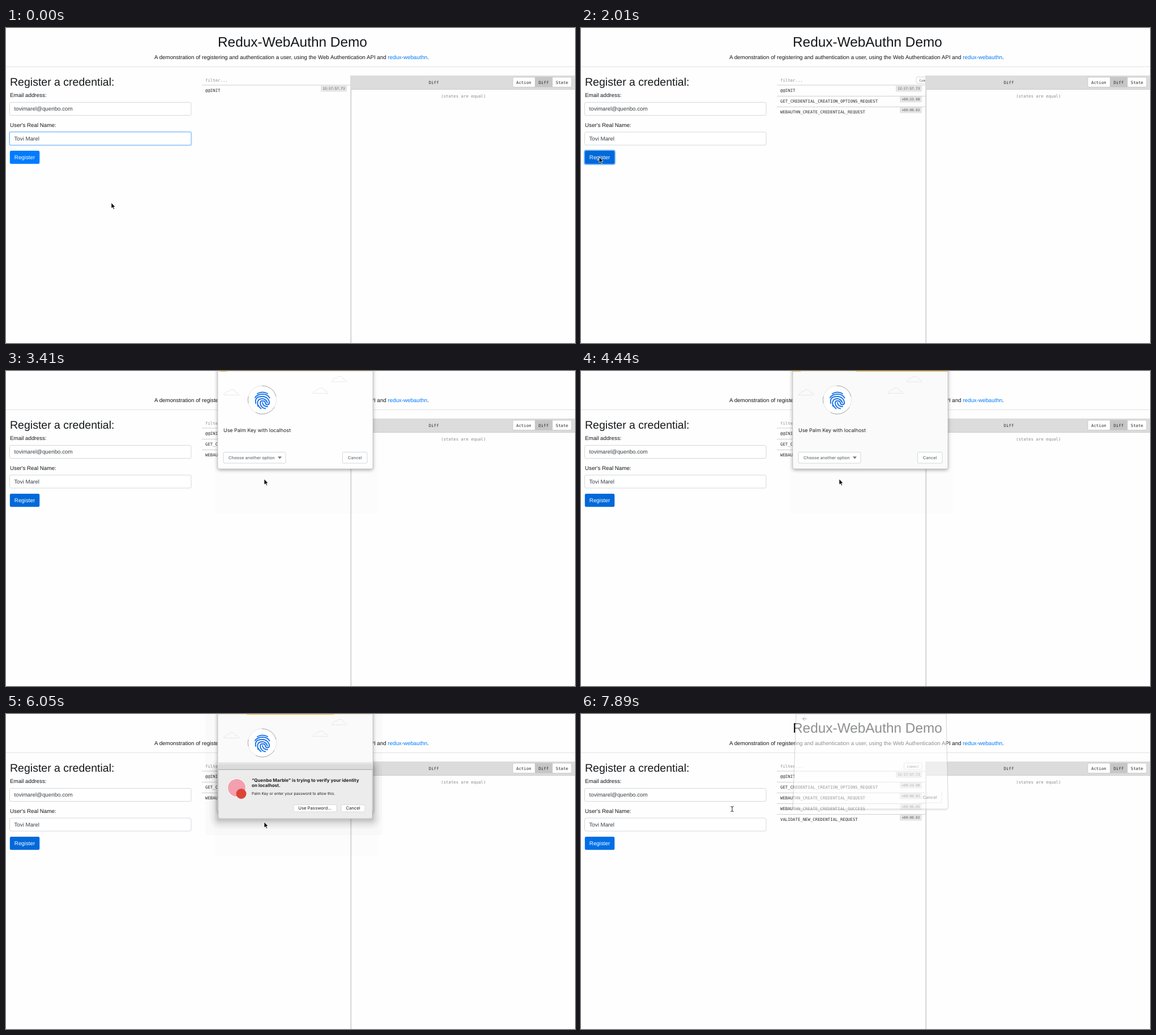
An HTML page for the animation above (8000 ms loop, 1005 px wide and 557 px high).

```html
<!DOCTYPE html>
<html lang="en">
<head>
<meta charset="utf-8">
<title>Redux-WebAuthn Demo</title>
<style>
  html, body { margin: 0; width: 100%; height: 100%; overflow: hidden; background: #fefefe; }
  svg { display: block; }
  #stage { width: 100vw; height: 100vh; }
  text { font: 9.765px "Liberation Sans", Arial, sans-serif; fill: #14171a; white-space: pre; text-rendering: geometricPrecision; }
  .value { fill: #3a4046; }
  .mono { font: 7.33px "DejaVu Sans Mono", monospace; fill: #2b2b2b; }
  .tiny { font-size: 5.9px; fill: #555; }
  .soft { fill: #8c8c8c; }
  .ui { font: 8.95px Inter, sans-serif; fill: #202124; }
  .bold { font-size: 8.05px; font-weight: 700; }
  .small { font-size: 7.7px; }
  .btn { font: 500 7.5px Inter, sans-serif; fill: #6b6f73; }
  .mid { text-anchor: middle; }
  .box { fill: #fff; stroke: #d4d7da; }
  .art { fill: none; stroke: #e2e3e4; stroke-width: .8; }
</style>
</head>
<body>
<svg id="stage" viewBox="0 0 1005 557">
  <defs>
    <filter id="blur" x="-30%" y="-30%" width="160%" height="170%"><feGaussianBlur stdDeviation="3"/></filter>
    <linearGradient id="lip" x2="0" y2="1">
      <stop offset="0" stop-color="#ededed"/><stop offset=".35" stop-color="#dcdcdc"/><stop offset="1" stop-color="#d8d8d8"/>
    </linearGradient>
    <path id="cloud" class="art" d="M0 10H27Q26 5.500 21 5.500Q20 0 14 .5Q9.500 .5 8.500 4Q4 3 3.500 6.500Q.5 7 0 10Z"/>
  </defs>

  <!-- page -->
  <text x="374" y="33" style="font-size:24.4px">Redux-WebAuthn Demo</text>
  <text x="262" y="54.500">A demonstration of registering and authentication a user, using the Web Authentication API and <tspan fill="#007bff">redux-webauthn</tspan>.</text>
  <path d="M0 68.500H1005" stroke="#e2e2e2"/>
  <text x="7" y="102" style="font-size:19.53px">Register a credential:</text>
  <text x="7" y="122">Email address:</text>
  <text x="7" y="174.500">User's Real Name:</text>
  <rect class="box" x="6.500" y="131.500" width="320.500" height="23" rx="2.400"/>
  <rect id="focus" x="5" y="182.500" width="323.500" height="26" rx="3.500" fill="#bfdeff"/>
  <rect id="field" class="box" x="6.500" y="184" width="320.500" height="23" rx="2.400"/>
  <text class="value" x="14.500" y="146">tovimarel@quenbo.com</text>
  <text class="value" x="14.500" y="198.500">Tovi Marel</text>
  <path id="caret" d="M71.500 190V201" stroke="#495057"/>
  <rect id="ring" x="5" y="215.200" width="56" height="27" rx="4" fill="#80bdff"/>
  <rect id="submit" x="6.800" y="217" width="52.500" height="23.300" rx="2.400"/>
  <text class="mid" x="33" y="232" style="fill:#fff">Register</text>

  <!-- action log -->
  <text class="mono soft" x="352" y="95">filter...</text>
  <g id="commit">
    <rect class="box" x=".5" y="86.500" width="32" height="11.500" rx="2"/>
    <text class="mono tiny mid" x="16.500" y="94.500">Commit</text>
  </g>
  <path d="M346 101H608" stroke="#cfcfcf"/>
  <g id="rows"></g>

  <!-- inspector -->
  <rect x="610" y="84" width="395" height="473" fill="#fefefe"/>
  <rect x="608" y="84" width="2.500" height="473" fill="#dcdcdc"/>
  <rect x="610" y="84" width="395" height="24.500" fill="#dcdcdc"/>
  <path d="M610 108.500H1005" stroke="#c9c9c9"/>
  <text class="mono mid" x="755.500" y="98.500">Diff</text>
  <g stroke="#cacaca">
    <rect x="895" y="87" width="104" height="17.500" rx="2" fill="#fff"/>
    <rect x="934.500" y="87" width="30.500" height="17.500" fill="#c6c6c6"/>
  </g>
  <text class="mono mid" x="914.500" y="98.500">Action</text>
  <text class="mono mid" x="949.500" y="98.500">Diff</text>
  <text class="mono mid" x="982" y="98.500">State</text>
  <text class="mono soft mid" x="808" y="123">(states are equal)</text>

  <!-- closing panel -->
  <g id="ghost">
    <path d="M380 0L374 166Q374 168 377 168H646Q649 168 648.500 165L645 0Z" fill="#fefefe" fill-opacity=".9" stroke="#b5b5b5"/>
    <path d="M378 169.500H646" stroke="#ddd" stroke-width="2"/>
    <path d="M399 8.500H391.500M395 5L391.500 8.500L395 12" fill="none" stroke="#777"/>
    <path d="M595 157H637V137" fill="none" stroke="#ddd" stroke-width=".8"/>
    <text class="btn mid" x="616" y="149.500">Cancel</text>
  </g>

  <!-- sheet shadow, behind the dialog -->
  <g id="shade"></g>

  <!-- security key dialog -->
  <g id="dialog">
    <rect x="368" y="0" width="290" height="251" fill-opacity=".006"/>
    <rect x="374" y="-20" width="274" height="195" rx="3" fill-opacity=".36" filter="url(#blur)"/>
    <path id="panel" d="M374 0H648V170Q648 173 645 173H377Q374 173 374 170Z" stroke="#c4c4c4" stroke-width=".8"/>
    <path d="M374 .5H648" stroke="#f9e7c4"/>
    <path id="bar" stroke="#f9ab1c"/>
    <use href="#cloud" x="384.500" y="32.500"/>
    <use href="#cloud" x="575" y="9"/>
    <use href="#cloud" x="542" y="29.500"/>
    <circle cx="452.500" cy="51" r="25" fill="#fff" stroke="#e4e4e4"/>
    <path d="M452 26A25 25 0 0 1 477 45M474 64A25 25 0 0 1 441 73.300M428 57A25 25 0 0 1 428 45" fill="none" stroke="#999" stroke-width=".8"/>
    <path fill="none" stroke="#1a73e8" stroke-width="2" stroke-linecap="round"
      d="M444 40Q453 35 462 40M440 47Q444 41 453 41T465.500 47.500M441 57C439 46 447 45 453 45S465.500 50 465 57C464 61 458 60 458 56C457 52 449 51 449 57C449.500 62 453 66 458 66.500M445 62C442 50 449 49 453 49S461 53 461.500 56M453 56C453 60 457 63 462 63M450.500 66.500Q447 64 445 60"/>
    <text class="ui" x="384" y="108.300">Use Palm Key with localhost</text>
    <rect class="box" x="384" y="143.500" width="110" height="19.500" rx="2"/>
    <text class="btn" x="393" y="156">Choose another option</text>
    <path d="M480 151.300H487L483.500 155.500Z" fill="#777"/>
    <rect class="box" x="594.500" y="143.500" width="43.500" height="19.500" rx="2"/>
    <text class="btn mid" x="616.200" y="156">Cancel</text>
  </g>

  <!-- system sheet -->
  <svg id="sheet" x="373" y="85" width="276" height="101">
    <g id="slip">
      <g transform="translate(-373 -85)">
        <rect x="374" y="85" width="274" height="14" fill="url(#lip)"/>
        <path d="M375 98H647V182Q647 185 644 185H378Q375 185 375 182Z" fill="#ececec" stroke="#bcbcbc" stroke-width=".8"/>
        <path d="M375 98.500H647" stroke="#b4b4b4"/>
        <circle cx="407.500" cy="130.500" r="18" fill="#f8f4f4" stroke="#dcdcdc" stroke-width=".6"/>
        <circle cx="407.500" cy="130.500" r="15.500" fill="#f3a0ae"/>
        <circle cx="415.500" cy="141" r="9" fill="#db4437"/>
        <text class="ui bold" x="434" y="119.500">“Quenbo Marble” is trying to verify your identity</text>
        <text class="ui bold" x="434" y="129.300">on localhost.</text>
        <text class="ui" x="434" y="142.500" style="font-size:6.75px">Palm Key or enter your password to allow this.</text>
        <g fill="#fff" stroke="#cdcdcd" stroke-width=".7">
          <rect x="508" y="160.500" width="76" height="12.500" rx="2.500"/>
          <rect x="592" y="160.500" width="42" height="12.500" rx="2.500"/>
        </g>
        <text class="ui small mid" x="545.500" y="169.400">Use Password...</text>
        <text class="ui small mid" x="613" y="169.400">Cancel</text>
      </g>
    </g>
  </svg>

  <!-- permission prompt -->
  <g id="prompt">
    <rect x="63" y="-20" width="196" height="99" rx="3" fill-opacity=".36" filter="url(#blur)"/>
    <path d="M63 0H259V74Q259 77 256 77H66Q63 77 63 74Z" fill="#fff" stroke="#c8c8c8" stroke-width=".7"/>
    <text class="ui" x="73" y="16.500" style="font-size:9.3px">http://localhost:5000 wants to</text>
    <path d="M246.500 4.500L251.500 9.500M251.500 4.500L246.500 9.500" stroke="#555"/>
    <rect x="73" y="27" width="10" height="8" rx="1" fill="#4a4d51"/>
    <path d="M78 29H82M78 31H82M78 33H82" stroke="#fff" stroke-width=".8"/>
    <text class="ui" x="91" y="33.800" style="font-size:7.2px">See the make and model of your Security Key</text>
    <rect class="box" x="165" y="47.500" width="39" height="19" rx="2"/>
    <text class="btn mid" x="184.500" y="59.600">Block</text>
    <rect class="box" x="209.500" y="47.500" width="39.500" height="19" rx="2"/>
    <text class="btn mid" x="229" y="59.600">Allow</text>
  </g>

  <path id="arrow" d="M0 0V10L2.300 8L4 11.600L5.600 11L4 7.500H7Z" fill="#000" stroke="#fff" stroke-width=".7"/>
  <path id="beam" d="M-2.500 -4.500Q0 -4.500 0 -3V3Q0 4.500 -2.500 4.500M2.500 -4.500Q0 -4.500 0 -3M0 3Q0 4.500 2.500 4.500" fill="none" stroke="#222"/>
</svg>
<script>
const LOOP = 8000, STEP = 150, TICK = 146.67;
const $ = id => document.getElementById(id);
const set = (id, name, value) => $(id).setAttribute(name, value);
const fade = (id, a) => { $(id).style.display = a > 0 ? '' : 'none'; set(id, 'opacity', a); };
const ramp = (t, a, b) => Math.min(1, Math.max(0, (t - a) / (b - a)));
const within = (t, a, b) => t >= a && t < b;

const log = [
  ['@@INIT', '12:17:57.73'],
  ['GET_CREDENTIAL_CREATION_OPTIONS_REQUEST', '+00:23.98'],
  ['WEBAUTHN_CREATE_CREDENTIAL_REQUEST', '+00:00.02'],
  ['WEBAUTHN_CREATE_CREDENTIAL_SUCCESS', '+00:06.05'],
  ['VALIDATE_NEW_CREDENTIAL_REQUEST', '+00:00.02']
];
$('rows').innerHTML = log.map(([name, stamp], i) => {
  const y = 101.5 + 19 * i, w = stamp.length * 3.55 + 7;
  return `<g>${i ? `<path d="M346 ${y}H608" stroke="#cfcfcf"/>` : ''}
    <text class="mono" x="352" y="${y + 11.5}">${name}</text>
    <rect x="${602 - w}" y="${y + .5}" width="${w}" height="10.5" rx="1.5" fill="#e4e4e4"/>
    <text class="mono tiny" x="${605.5 - w}" y="${y + 7.8}">${stamp}</text></g>`;
}).join('');

// banded shadow: stacked rounded layers around the sheet
const layer = (grow, alpha, r) => `<rect x="${375 - grow}" y="${96 - grow}" width="${272 + 2 * grow}"
  height="${91 + 2 * grow}" rx="${r}" fill-opacity="${alpha}"/>`;
$('shade').innerHTML = '<rect x="352" y="0" width="313" height="214" fill-opacity=".014"/>' +
  [2, 5, 8, 12, 16].map((g, i) => layer(g, .065 - .01 * i, g + 3)).join('');

// pointer stops: time, x, y
const stops = [
  [0, 186, 309], [750, 32, 228], [1950, 32, 228], [2250, 330, 190], [2550, 735, 120],
  [2850, 600, 160], [3000, 470, 196], [3150, 456, 191], [7050, 456, 191],
  [7350, 229, 57], [7500, 229, 57], [7800, 267, 168]
];
function pointer(t) {
  let i = 0;
  while (i < stops.length - 2 && t >= stops[i + 1][0]) i++;
  const [t0, x0, y0] = stops[i], [t1, x1, y1] = stops[i + 1];
  let p = ramp(t, t0, t1);
  p = p * p * (3 - 2 * p);
  return [x0 + (x1 - x0) * p, y0 + (y1 - y0) * p];
}

// indeterminate progress: one long slug, then a short one
function progress(t) {
  if (t < 3400) return '';
  const tick = Math.floor((t - 3402) / TICK) * TICK;
  const c = (.029 + Math.max(0, tick) / 1962) % 1;
  const slug = (a, b) => `M${374 + 274 * a} .5H${374 + 274 * Math.min(1, b)}`;
  if (c < .5) return slug(c / 2, c * 2);
  const s = (c - .5) * 4 % 1;
  if (c < .75) return slug(.25 + .75 * s, 1) + slug(0, .25 * s);
  return slug(s, s + .25 * (1 - s));
}

function draw(t) {
  const clicked = t >= 1860;
  fade('focus', clicked ? 0 : 1);
  set('field', 'style', clicked ? '' : 'stroke:#80bdff');
  fade('caret', within(t, 300, 820) || within(t, 1420, 1860) ? 1 : 0);
  fade('ring', within(t, 1860, 2400) ? 1 : 0);
  set('submit', 'fill', t < 600 ? '#007bff' : t < 7850 ? '#0069d9' : '#006fe6');

  fade('commit', clicked ? 1 : 0);
  set('commit', 'transform', `translate(${608 - 38 * ramp(t, 1860, 2210)} 0)`);
  const count = !clicked ? 1 : t < 7700 ? 3 : 5;
  [...$('rows').children].forEach((row, i) => { row.style.display = i < count ? '' : 'none'; });

  const sheet = ramp(t, 4440, 4700) * (1 - ramp(t, 6120, 6260));
  fade('dialog', t < 7710 ? ramp(t, 2280, 2480) : 0);
  set('panel', 'fill', sheet > 0 ? '#f9faf9' : '#fefefe');
  set('bar', 'd', progress(t));
  fade('shade', sheet);
  fade('sheet', sheet > 0 ? 1 : 0);
  set('sheet', 'height', Math.max(1, 101 * sheet));
  set('slip', 'transform', `translate(0 ${-101 * (1 - sheet)})`);
  fade('ghost', t < 7710 ? 0 : 1 - .42 * ramp(t, 7710, 7880));
  fade('prompt', t < 7560 ? ramp(t, 6700, 6900) : 0);

  const [x, y] = pointer(Math.floor(t / STEP) * STEP);
  const text = t >= 7800;
  fade('arrow', text ? 0 : 1);
  fade('beam', text ? 1 : 0);
  set(text ? 'beam' : 'arrow', 'transform', `translate(${x} ${y})`);
}

const start = performance.now();
function loop(now) {
  draw(Math.max(0, now - start) % LOOP);
  requestAnimationFrame(loop);
}
draw(0);
requestAnimationFrame(loop);
</script>
</body>
</html>
```
